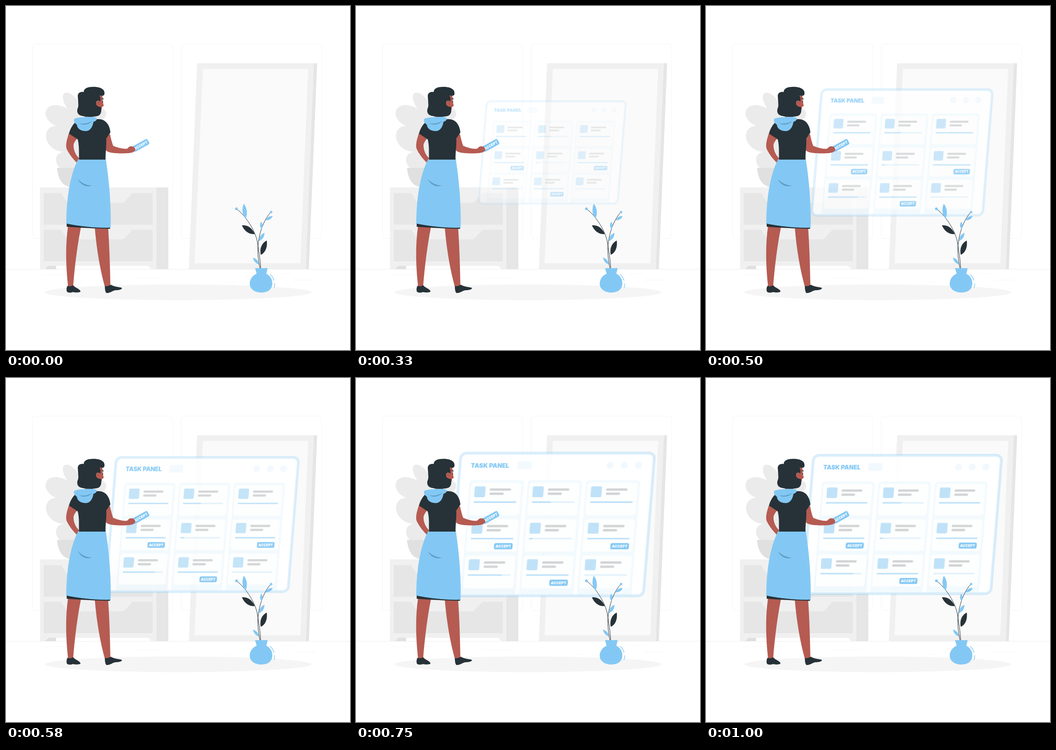
Recreate the animation shown at these times as an HTML page. Size 748 px wide and 748 px high, loop 1.04 s.

```html
<!DOCTYPE html>
<html lang="en">
<head>
<meta charset="utf-8">
<title>Task panel</title>
<style>
  html, body { margin: 0; width: 100%; height: 100%; overflow: hidden; background: #fff; }
  svg { display: block; width: 100vw; height: 100vh; }
  text { font-family: Inter, "Open Sans", Arial, sans-serif; font-weight: 900; }
  .blue { fill: #83c8f4; }
  .dark { fill: #263238; }
  .skin { fill: #b55b52; }
  .fold { fill: #5f9cc4; }
  .label { fill: #fff; font-size: 7.8px; text-anchor: middle; }
  #panel { transform-origin: 427px 318.5px; }
</style>
</head>
<body>
<svg viewBox="0 0 748 748">
  <!-- room -->
  <g fill="none" stroke="#f5f5f5">
    <rect x="57.5" y="83" width="305" height="422.5" rx="6"/>
    <rect x="381" y="83" width="305.5" height="422.5" rx="6"/>
    <path d="M0 572.5H748" stroke="#efefef"/>
    <path d="M79 584.5H166M276 591.5H337M594 582H624M625 596H672M483 600.5H497" stroke="#f7f7f7"/>
  </g>

  <!-- mirror -->
  <path d="M415.500 124.500H670L652.500 572H397.500Z" fill="#f0f0f0"/>
  <path d="M669.500 124.500H676.500L658.500 572H652Z" fill="#e5e5e5"/>
  <path d="M428 137H657L640 559.500H410Z" fill="#fafafa"/>

  <!-- plant on the cabinet -->
  <path fill="#ebebeb" d="M124 194Q126 186 138 189.500Q152 196 158 212H165V355H122C112 350 108 340 109 331C111 322 118 317 128 317
    C105 318 87 300 87 283C87 268 98 260 110 261C96 256 85 244 86 232C88 217 103 213 118 217Q128 219 134 224C127 213 122 203 124 194Z
    M196 225C208 219 218 225 218 235C217 246 205 251 195 250Z"/>
  <path fill="#e0e0e0" d="M111 352H165V394H141C124 392 113 378 111 352Z"/>

  <!-- cabinet -->
  <path fill="#f0f0f0" d="M74 394.500H327V572H316L309 565H92L85 572H74Z"/>
  <path fill="#e6e6e6" d="M327 394.500H353V572H327Z"/>
  <path fill="#e0e0e0" d="M92 565H109V572H85Z"/>
  <g id="drawers" fill="#e6e6e6"></g>

  <ellipse cx="374" cy="622.500" rx="290" ry="17" fill="#f5f5f5"/>

  <g id="panel"><g id="board" transform="matrix(1 0 -.08 1 25.480 0)"></g></g>

  <!-- woman -->
  <path class="skin" d="M137 276C132 291 129 303 132 311C138 324 148 335 154 341L161 337L159 331C150 323 146 310 147 301Q149 294 155 288Z"/>
  <path class="skin" d="M135 478C128 525 131 575 135 610H146C149 570 155 520 163 481Z"/>
  <path class="skin" d="M193 481C197 530 205 575 215 611L227 609C226 565 225 525 222 481Z"/>
  <path class="dark" d="M134 608C138 611 143 609 146 607C149 612 160 615 162 620C162 624 148 623 145 622C142 624 133 624 132 620C131 615 132 611 134 608Z"/>
  <path class="dark" d="M215 609C219 610 225 608 228 606C236 611 248 611 252 613C253 617 243 618 238 618C232 619 225 625 218 624C215 620 215 613 215 609Z"/>
  <path class="dark" d="M132 470L227 480L226 484.500C195 484 160 482 132 480Z"/>
  <path class="blue" d="M157 333H217C223 370 229 430 227.500 482C195 483 160 479 131 473C131 430 137 370 157 333Z"/>
  <path class="fold" d="M156 376C163 384 173 390 187 390.500C175 395 162 389 156 376Z"/>
  <path class="skin" d="M172 235H189V245H172Z"/>

  <g transform="rotate(-29 293 303)">
    <rect class="blue" x="274" y="296.500" width="38" height="13" rx="3.500"/>
    <text class="label" x="293" y="305.900">ACCEPT</text>
  </g>
  <path class="skin" d="M209 289C211 305 214 314 222 317C232 321 253 321 264 320C271 320 280 318 281 313C282 307 274 303 268 306L263 310.500C255 311 245 309 233 304Q229 293 226 278Z"/>
  <path class="dark" d="M153 251C146 256 139 268 137 277.500L156 290C160 306 158 320 159 334H216.500C216 318 219 303 218 288L227 275C226 260 217 245 200 246Z"/>
  <path class="blue" d="M149 245C160 241 185 240 195 242C200 244 197 250 190 252C189 262 183 272 174 272C164 272 155 268 154 258C148 254 146 248 149 245Z"/>
  <path class="fold" d="M159 255C170 257 179 255 187 250C182 257 169 261 159 255Z"/>

  <path class="skin" d="M200 193L209 195C211 200 210 206 211 210L212.500 217L209 219L208 225H196Z"/>
  <path class="dark" d="M156 195C157 187 164 186 169 187C169 180 176 176 186 176C198 175 207 178 210 181C215 184 215 192 213 194C210 196 206 195 203 194.500
    C206 199 206 204 205 208C201 203 196 206 196 211C196 216 200 220 206 219C208 226 208 234 202 238C195 242 172 242 162 238C154 235 154 227 156 222Q158 218 157 210Z"/>
  <ellipse cx="200.500" cy="211.500" rx="4.800" ry="5.800" class="skin"/>
  <path d="M198 209Q202 209 203 214" fill="none" stroke="#9c4a43" stroke-width=".8"/>
  <path d="M208 202Q211 200 212 203M210.500 207V210" fill="none" stroke="#263238" stroke-width="1.300"/>
  <path d="M208.500 217L212 216.500L209.500 219Z" fill="#cc2d2d"/>

  <!-- vase -->
  <path d="M501 441C520 455 540 485 546 510C549 530 553 550 554 572M576 448C563 462 553 485 549 512C546 530 548 550 552.500 572" fill="none" stroke="#263238"/>
  <path class="blue" d="M517 430C512 442 514 456 521 462C526 452 524 438 517 430Z
    M555 469C551 475 552 482 556 485C559 480 558 473 555 469Z M562 493C554 497 550 503 550 511C558 508 562 502 562 493Z
    M580 457C573 456 567 460 565 466C572 466 577 463 580 457Z M537 547C544 549 549 554 550 562C543 560 538 554 537 547Z"/>
  <path class="dark" d="M513 477C526 475 536 484 541 496C528 497 518 489 513 477Z M567 510C556 515 551 528 554 541C564 537 569 524 567 510Z"/>
  <circle class="blue" cx="501" cy="441" r="3"/>
  <circle class="blue" cx="576.500" cy="448" r="2.600"/>
  <path class="blue" d="M541.500 570H569L566 582C574 586 580 594 579 605C578 618 567 623 555 623C542 623 530 616 530 604C530 594 536 586 545 582Z"/>
  <path d="M574 583Q580 588 583 597M584 603Q585 608 583 613" fill="none" stroke="#83c8f4" stroke-width="1.300"/>
</svg>

<script>
const BLUE = '#83c8f4';
const board = document.getElementById('board');

function add(parent, tag, attrs, content) {
  const el = document.createElementNS('http://www.w3.org/2000/svg', tag);
  for (const key in attrs) el.setAttribute(key, attrs[key]);
  if (content) el.textContent = content;
  parent.append(el);
}

function box(x, y, width, height, rx, fill, alpha = 1) {
  add(board, 'rect', { x, y, width, height, rx, fill, 'fill-opacity': alpha });
}

for (const y of [407, 486.5]) {
  add(document.getElementById('drawers'), 'path', {
    d: `M82 ${y}H120L129 ${y + 14}Q134 ${y + 21} 142 ${y + 21}H251Q257 ${y + 21} 262 ${y + 14}L275 ${y}H319V${y + 68.5}H82Z`
  });
}

// Panel frame and header
box(222, 168, 409, 301, 12, '#fff', .9);
add(board, 'rect', { x: 222, y: 168, width: 409, height: 301, rx: 12, fill: 'none',
  stroke: BLUE, 'stroke-opacity': .3, 'stroke-width': 6 });
add(board, 'text', { x: 245, y: 198.5, 'font-size': 12.9, fill: BLUE }, 'TASK PANEL');
box(343, 185, 31, 17, 4, BLUE, .1);
for (const cx of [539, 569, 599]) {
  add(board, 'circle', { cx, cy: 193.5, r: 7.6, fill: BLUE, 'fill-opacity': .1 });
}

// Progress of each card by row; cards that carry a button
const progress = [[1, .45, 1], [1, .09, 1], [.8, 1, 0]];
const buttons = ['1,0', '1,2', '2,1'];

for (let col = 0; col < 3; col++) {
  const x = 249 + col * 122.8;
  add(board, 'path', { d: `M${x - 4} 466V233q0 -8 8 -8h99q8 0 8 8V466Z`, fill: BLUE, 'fill-opacity': .1 });
  for (let row = 0; row < 3; row++) {
    const y = 230.3 + row * 77;
    const done = progress[row][col];
    box(x, y, 106, 68.7, 5, '#fff', .85);
    box(x + 8, y + 7.7, 23, 23, 3, BLUE, .5);
    box(x + 40, y + 12, 45, 5, 2.5, '#d2d4d5');
    box(x + 40, y + 20.8, 30, 5, 2.5, '#d2d4d5');
    box(x + 8, y + 39.5, 90, 3, 1.5, BLUE, .25);
    if (done) box(x + 8, y + 39.5, 90 * done, 3, 1.5, BLUE, .4);
    if (buttons.includes(`${row},${col}`)) {
      box(x + 58.6, y + 50.6, 39, 13, 3.5, BLUE);
      add(board, 'text', { x: x + 78.1, y: y + 59.9, class: 'label' }, 'ACCEPT');
    }
  }
}

// Zoom in with overshoot, shown in 24 steps per second
const LOOP = 1040, RATE = 24;
const panel = document.getElementById('panel');
const zoom = panel.animate(
  [{ opacity: 0, transform: 'scale(.5)' }, { opacity: 1, transform: 'scale(1)' }],
  { duration: 1000, fill: 'both', easing: 'cubic-bezier(.36, -.01, .5, 1.38)' }
);
zoom.pause();

const start = performance.now();
function draw() {
  const tick = Math.floor(Math.max(0, performance.now() - start) % LOOP / 10);
  const step = Math.floor((tick + .49) * RATE / 100);
  zoom.currentTime = Math.min(1000, (step + .95) * 1000 / RATE);
  panel.style.visibility = step < 4 ? 'hidden' : 'visible';
  requestAnimationFrame(draw);
}
draw();
</script>
</body>
</html>
```
